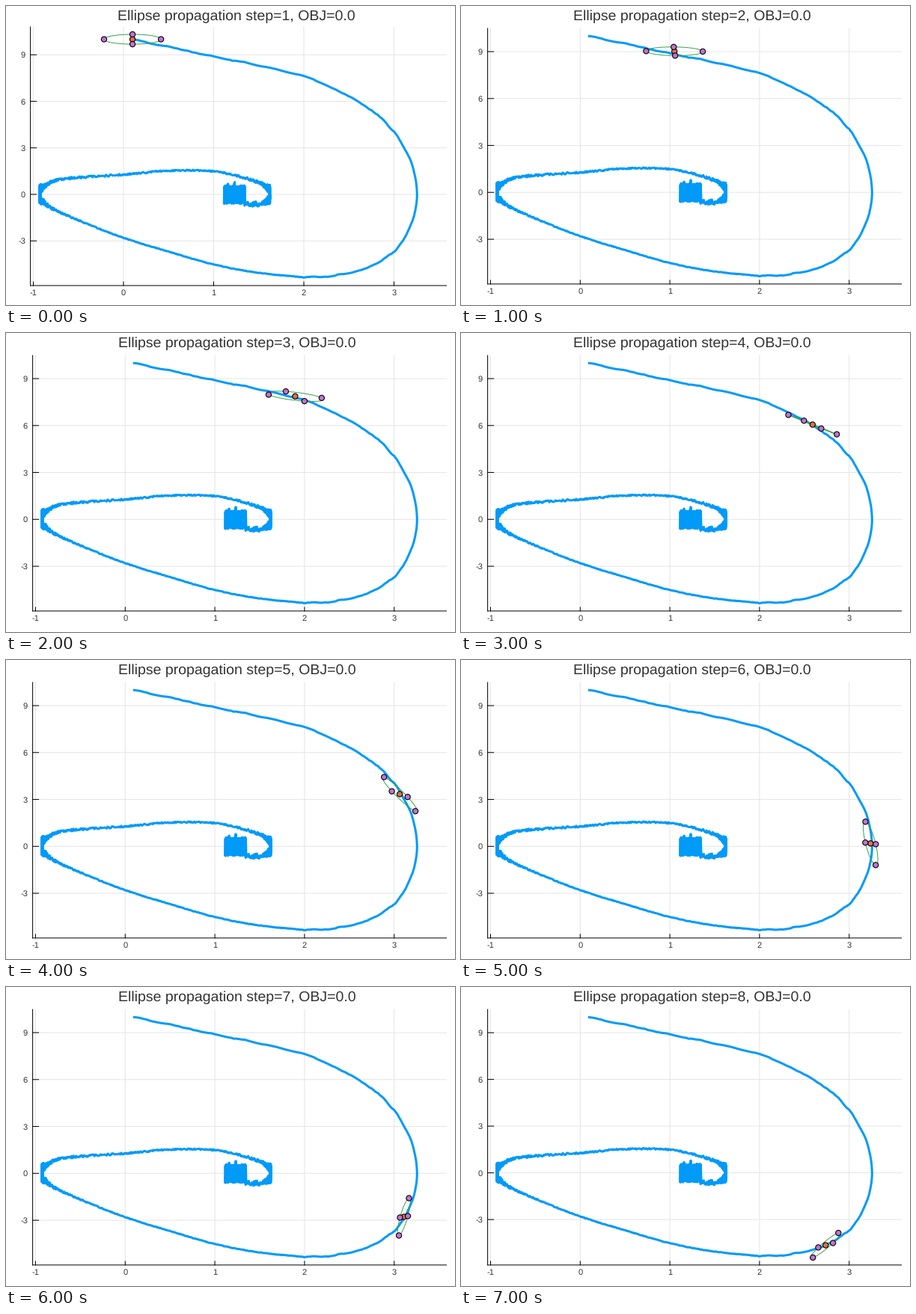
Write a matplotlib script that moves like this. It is 600x400 px and loops after 8 s.

```python
import numpy as np
import matplotlib.pyplot as plt
from matplotlib.animation import FuncAnimation
from matplotlib.patches import Circle

W, H, DPI = 600, 400, 100
PX = 72 / DPI  # points per pixel
DT = 0.1
BLUE, ORANGE, GREEN, PURPLE = "#009af9", "#e26f46", "#3da44d", "#c271d2"
INK = "#333333"
plt.rcParams["text.hinting"] = "none"

# View: pixel of the data origin, pixels per unit, plot box (left, right, top, bottom)
FIRST = ((157, 252), (120.5, -20.75), (32.6, 588.5, 28, 374))
MAIN = ((159.3, 249.3), (119.8, -20.92), (35.6, 588.5, 30, 371.9))
LAST = ((159.3, 248.6), (119.8, -20.83), (35.6, 588.5, 30, 371.9))
VIEWS = [FIRST] + [MAIN] * 6 + [LAST]

# Ellipse per step: speed at the centre and two conjugate half-diameters
SPEED = np.array([10, 9.02, 7.87, 6.06, 3.34, 0.19, -2.78, -4.65])
LONG = [(.316, 0), (.316, -.014), (.296, -.105), (.27, -.62),
        (.175, -1.09), (.057, -1.386), (-.056, -1.195), (-.142, -.79)]
SHORT = [(0, .316), (.008, -.277), (.104, -.31), (.096, -.25),
         (.088, -.18), (.058, -.05), (.044, .048), (.082, .143)]
PLACE = 0.1 + DT * np.append(0, np.cumsum((SPEED[1:] + SPEED[:-1]) / 2))

# Key points of the path: a smooth swing, then a tail that gets noisy when slow
SWING = [(.1, 10), (.52, 9.48), (1, 8.9), (1.38, 8.45), (2.01, 7.6),
         (2.49, 6.33), (2.82, 5.1), (3.03, 3.79), (3.19, 2.07),
         (3.255, .1), (3.21, -1.61), (3.085, -3.12), (2.88, -4.2),
         (2.62, -4.9), (2.26, -5.3), (2, -5.35)]
TAIL = [(2, -5.35), (1.5, -5.06), (1, -4.52), (.5, -3.69), (0, -2.8),
        (-.5, -1.67), (-.78, -.94), (-.9, -.42), (-.93, 0), (-.9, .44),
        (-.745, .92), (-.47, 1.1), (.02, 1.28), (.47, 1.51), (.98, 1.49),
        (1.36, 1.04), (1.56, .59), (1.625, 0), (1.55, -.56), (1.35, -.63)]


def spline(knots, n):
    """Catmull-Rom curve with n samples between neighbouring knots."""
    p = np.array(knots, float)
    p = np.vstack([2 * p[0] - p[1], p, 2 * p[-1] - p[-2]])
    t = np.linspace(0, 1, n, endpoint=False)[:, None]
    parts = []
    for a, b, c, d in zip(p, p[1:], p[2:], p[3:]):
        parts.append(b + t * (c - a) / 2
                     + t**2 * (2 * a - 5 * b + 4 * c - d) / 2
                     + t**3 * (3 * b - a - 3 * c + d) / 2)
    return np.vstack(parts + [p[-2:-1]])


def build_path():
    rng = np.random.default_rng(4)
    swing = spline(SWING, 12)
    wobble = rng.normal(0, 0.05, len(swing))
    swing[:, 1] += np.convolve(wobble, np.ones(4) / 4, "same")
    tail = spline(TAIL, 45)
    speed = tail[:, 1]
    noise = 0.53 / (1 + 6.8 * speed**2) + 0.015
    tail[:, 1] = speed + noise * rng.uniform(-1, 1, len(tail))
    x = np.linspace(1.345, 1.115, 120)
    chatter = (0.47 + rng.exponential(0.05, len(x))) * (-1) ** np.arange(len(x))
    return np.vstack([swing, tail, np.column_stack([x, chatter])])


PATH = build_path()

fig = plt.figure(figsize=(W / DPI, H / DPI), dpi=DPI, facecolor="white")
ax = fig.add_axes([0, 0, 1, 1])


def to_stage(points, view):
    return np.array(points) * view[1] + view[0]


def line(x, y, color, width, **kw):
    ax.plot(x, y, color=color, lw=width * PX, snap=False, **kw)


def label(x, y, text, size, ha):
    ax.text(x, y, text, fontsize=size, family="Liberation Sans",
            color=INK, ha=ha, va="baseline")


def dots(points, color):
    for p in points:
        ax.add_patch(Circle(p, 3.6, fc=color, ec="black", lw=1.1 * PX, zorder=3))


def draw_axes(view):
    (ox, oy), (sx, sy), (left, right, top, bottom) = view
    xs = [(v, ox + v * sx) for v in range(-1, 4)]
    ys = [(v, oy + v * sy) for v in range(-3, 10, 3)]
    for _, x in xs:
        line([x, x], [top, bottom], "#e5e5e5", 1)
    for _, y in ys:
        line([left, right], [y, y], "#e5e5e5", 1)
    line([left, left], [top, bottom], "black", 1)
    line([left, right], [bottom, bottom], "black", 1)
    for v, x in xs:
        line([x, x], [bottom - 5, bottom], "black", 1)
        label(x, bottom + 13.2, str(v), 8, "center")
    for v, y in ys:
        line([left, left + 8], [y, y], "black", 1)
        label(left - 6.5, y + 4, str(v), 8, "right")


def update(i):
    ax.clear()
    ax.axis("off")
    ax.set_xlim(0, W)
    ax.set_ylim(H, 0)
    view = VIEWS[i]
    draw_axes(view)
    line(*to_stage(PATH, view).T, BLUE, 3, solid_joinstyle="round")

    centre = np.array([PLACE[i], SPEED[i]])
    a, b = np.array(LONG[i]), np.array(SHORT[i])
    t = np.linspace(0, 2 * np.pi, 100)[:, None]
    line(*to_stage(centre + a * np.cos(t) + b * np.sin(t), view).T, GREEN, 1)
    dots(to_stage([centre], view), ORANGE)
    dots(to_stage([centre + a, centre - a, centre + b, centre - b], view), PURPLE)

    middle = (view[2][0] + view[2][1]) / 2 - 2.8
    label(middle, 19, f"Ellipse propagation step={i + 1}, OBJ=0.0", 14, "center")
    return []


anim = FuncAnimation(fig, update, frames=len(VIEWS), init_func=lambda: [],
                     interval=1000, repeat=True, repeat_delay=0)
plt.show()
```
